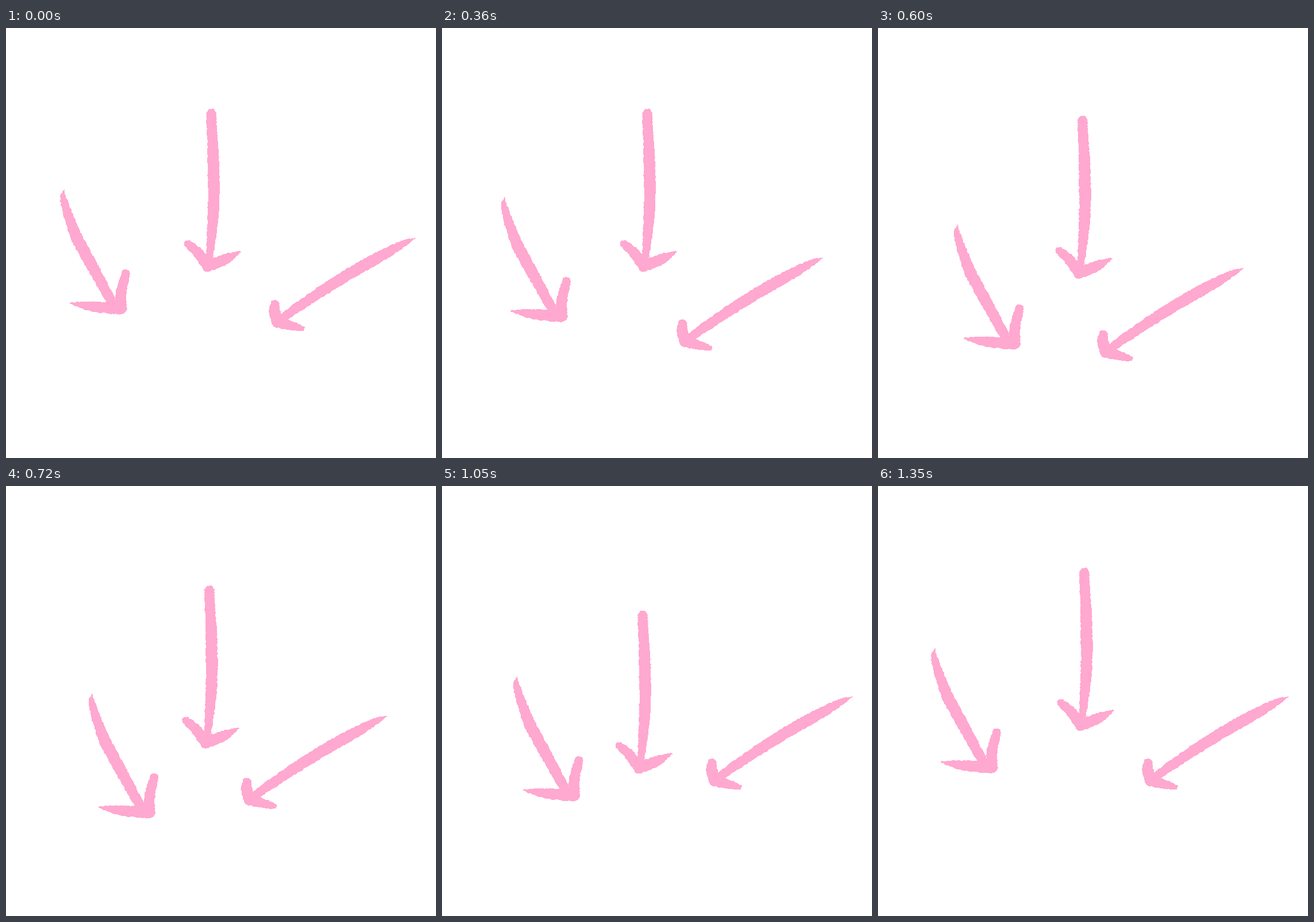
An HTML page that plays this animation: 748x748 px, repeating every 1500 ms.

```html
<!DOCTYPE html>
<html lang="en">
<head>
<meta charset="utf-8">
<title>Three arrows</title>
<style>
  html, body { margin: 0; width: 100%; height: 100%; overflow: hidden; background: #fff; }
  svg { display: block; width: 100vw; height: 100vh; }
  path { fill: #ffa8d0; shape-rendering: crispEdges; }
</style>
</head>
<body>
<svg id="stage" viewBox="0 0 748 748"></svg>
<script>
const LOOP = 1500, STEP = 30, LAST = 1350;
const GRAIN = 3, ROUGH = 1.8;

// Brush keys are [x, y, width]; both barbs run into the hub.
// go, peak, back: times of leaving, furthest point and return; far, end: offsets there.
const arrows = [
  {
    shaft: [[101, 282, 1], [101, 301, 12], [122, 362, 20], [150, 414, 19.5], [186, 481, 17]],
    barbs: [[[208.5, 427, 15], [201, 458, 18]], [[113, 479, 3], [151, 484.5, 18]]],
    hub: [200, 488, 20],
    go: 210, peak: 810, back: 1350, far: [52.6, 85], end: [-2, 1.5]
  },
  {
    shaft: [[357, 149, 17], [361, 240, 20], [361, 310, 20], [357, 370, 15.5], [354, 402, 11]],
    barbs: [[[316.5, 375.5, 13], [334, 391, 18]], [[407, 389, 3], [382, 402, 18]]],
    hub: [351, 414, 20],
    go: 450, peak: 1050, back: 1350, far: [-8, 76.3], end: [1.7, 1.7]
  },
  {
    shaft: [[711, 366, 1], [690, 376, 12], [650, 398, 19], [585, 435, 20], [510, 484, 17], [482, 504, 14]],
    barbs: [[[468, 481, 16], [467, 492, 19]], [[515, 522.5, 9], [494, 517, 17]]],
    hub: [472, 512, 19],
    go: 0, peak: 600, back: 900, far: [-76, 52.3], end: [2, 1]
  }
];

function random(seed) {
  return () => (seed = (seed * 16807) % 2147483647) / 2147483647;
}

// Smooth curve through the keys, sampled about every GRAIN pixels
function spine(keys) {
  const out = [];
  for (let i = 0; i < keys.length - 1; i++) {
    const p1 = keys[i], p2 = keys[i + 1];
    const p0 = keys[i - 1] || p1, p3 = keys[i + 2] || p2;
    const n = Math.ceil(Math.hypot(p2[0] - p1[0], p2[1] - p1[1]) / GRAIN);
    for (let k = 0; k < n; k++) {
      const u = k / n;
      out.push(p1.map((b, j) => {
        const a = p0[j], c = p2[j], d = p3[j];
        return b + u / 2 * (c - a + u * (2 * a - 5 * b + 4 * c - d + u * (3 * (b - c) + d - a)));
      }));
    }
  }
  return [...out, keys.at(-1)];
}

// Outline of one chalky brush stroke with round ends
function stroke(keys, rand) {
  const pts = spine(keys), last = pts.length - 1, outline = [];
  const add = (i, angle) => {
    const [x, y, w] = pts[i];
    const a = pts[Math.max(0, i - 1)], b = pts[Math.min(last, i + 1)];
    const dir = Math.atan2(b[1] - a[1], b[0] - a[0]) + Math.PI / 2 - angle;
    const r = Math.max(0.5, w / 2 + (rand() - 0.5) * ROUGH);
    outline.push((x + r * Math.cos(dir)).toFixed(1) + ',' + (y + r * Math.sin(dir)).toFixed(1));
  };
  const cap = (i, from) => {
    for (let k = 1; k < 8; k++) add(i, from + Math.PI * k / 8);
  };
  for (let i = 0; i <= last; i++) add(i, 0);
  cap(last, 0);
  for (let i = last; i >= 0; i--) add(i, Math.PI);
  cap(0, Math.PI);
  return 'M' + outline.join('L') + 'Z';
}

const stage = document.getElementById('stage');
const rand = random(7919);
for (const a of arrows) {
  const strokes = [a.shaft, ...a.barbs.map(b => [...b, a.hub])];
  a.el = document.createElementNS('http://www.w3.org/2000/svg', 'path');
  a.el.setAttribute('d', strokes.map(keys => stroke(keys, rand)).join(''));
  stage.append(a.el);
}

function ease(from, to, t) {
  const u = Math.min(1, Math.max(0, (t - from) / (to - from)));
  return u * u * (3 - 2 * u);
}

function draw() {
  const t = Math.min(LAST, Math.floor(performance.now() % LOOP / STEP) * STEP);
  for (const { el, go, peak, back, far, end } of arrows) {
    const out = ease(go, peak, t), home = ease(peak, back, t);
    const [x, y] = far.map((f, i) => f * out * (1 - home) + end[i] * home);
    el.setAttribute('transform', `translate(${x.toFixed(2)} ${y.toFixed(2)})`);
  }
  requestAnimationFrame(draw);
}
draw();
</script>
</body>
</html>
```
